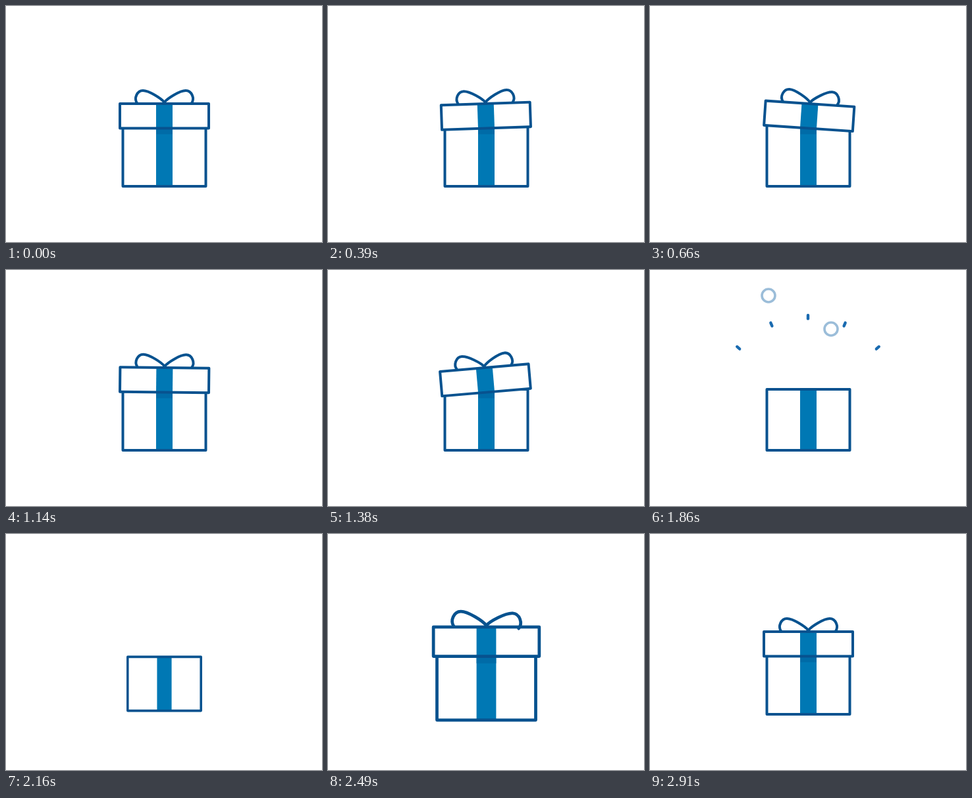
These frames come from a looping animation (480x360 px, 3540 ms). An HTML page:

```html
<!DOCTYPE html>
<html lang="en">
<head>
<meta charset="utf-8">
<title>Gift box</title>
<style>
  html, body { margin: 0; width: 100%; height: 100%; overflow: hidden; background: #fff; }
  svg { display: block; width: 100%; height: 100%; }
  .line { fill: none; stroke: #07528f; stroke-width: 4; stroke-linejoin: round; stroke-linecap: round; }
  .paper { fill: #fff; }
  .ribbon { fill: #0078b4; }
  .shade { fill: #006ba7; }
  .ring { stroke: #1262a6; stroke-width: 3.6; }
  .ray { stroke: #1a6bb0; stroke-width: 4.4; }
</style>
</head>
<body>
<svg viewBox="0 0 480 360">
  <g id="rays"></g>
  <circle id="ringA" class="line ring" r="10"/>
  <circle id="ringB" class="line ring" r="10"/>
  <g id="box">
    <rect class="paper" x="177.5" y="182" width="126" height="93"/>
    <rect class="ribbon" x="228" y="182" width="25" height="93"/>
    <rect class="line" x="177.5" y="182" width="126" height="93"/>
  </g>
  <rect id="shade" class="shade" x="228" y="186" width="25" height="9.5"/>
  <g id="lid">
    <rect class="paper" x="173" y="149" width="135" height="37.5"/>
    <rect class="ribbon" x="228" y="149" width="25" height="37.5"/>
    <rect class="line" x="173" y="149" width="135" height="37.5"/>
    <path class="line" d="M199 148C194 141 199 129 208 129C217 129 236 141 240.5 147"/>
    <path class="line" id="loop" d="M282 148C287 141 282 129 273 129C264 129 245 141 240.5 147"/>
  </g>
</svg>
<script>
const LOOP = 3540, CX = 240.5, HINGE = 186, MID = 228.5;
const $ = id => document.getElementById(id);
const clamp = x => Math.min(1, Math.max(0, x));
const span = (t, a, b) => clamp((t - a) / (b - a));
const ease = x => (1 - Math.cos(Math.PI * x)) / 2;
const out = x => 1 - (1 - x) ** 2;

// Eased value from a list of [time, value] steps
function track(t, steps) {
  let [t0, v0] = steps[0];
  for (const [t1, v1] of steps) {
    if (t < t1) return t <= t0 ? v0 : v0 + (v1 - v0) * ease(span(t, t0, t1));
    t0 = t1;
    v0 = v1;
  }
  return v0;
}

const TILT = [[0, 0], [150, -6], [300, 6], [450, -6], [600, 6], [750, 0],
  [1110, 0], [1260, 6], [1410, -6], [1530, 0]];
const SCALE = [[1950, 1], [2190, 0.88], [2430, 1.22], [2700, 0.975], [2910, 1]];
const SWAY = [[2190, 0], [2470, 4], [2760, -5], [2910, 0]];

const rays = [-48, -23, 0, 23, 48].map(deg => {
  const el = document.createElementNS("http://www.w3.org/2000/svg", "line");
  el.setAttribute("class", "line ray");
  el.setAttribute("transform", `translate(240 214) rotate(${deg})`);
  $("rays").append(el);
  return el;
});

const set = (el, attrs) => {
  for (const k in attrs) el.setAttribute(k, attrs[k]);
};
const scaleAt = (s, y) => `translate(${CX} ${y}) scale(${s}) translate(${-CX} ${-y})`;

function ring(el, t, start, from, to) {
  const p = out(span(t, start, start + 300));
  set(el, {
    cx: from[0] + (to[0] - from[0]) * p,
    cy: from[1] + (to[1] - from[1]) * p,
    opacity: t < start ? 0 : 1 - span(t, 1740, 1950)
  });
}

function draw(t) {
  const s = track(t, SCALE);
  set($("box"), { transform: scaleAt(s, MID) });

  const fly = t < 2190 ? span(t, 1530, 1710) : 0;
  const p = ease(fly);
  const seen = t < 2190 ? 1 - fly : span(t, 2190, 2280);
  const turn = track(t, TILT) + 50 * p;
  set($("lid"), {
    transform: `translate(${39 * p ** 1.5} ${-95 * p}) rotate(${turn} ${CX} ${HINGE}) ` + scaleAt(s, HINGE),
    opacity: seen
  });
  set($("loop"), { transform: `rotate(${track(t, SWAY)} ${CX} 147)` });
  set($("shade"), {
    transform: scaleAt(s, HINGE),
    opacity: t < 2190 ? 1 - span(t, 1530, 1560) : seen
  });

  ring($("ringA"), t, 1530, [238, 205], [180, 39]);
  ring($("ringB"), t, 1560, [247, 199], [275, 90]);

  const head = 108 + 37 * ease(span(t, 1560, 1800));
  const tail = 108 + 37 * ease(span(t, 1680, 1920));
  const lit = t >= 1560 && t < 1920 ? 1 : 0;
  for (const el of rays) set(el, { y1: -tail, y2: -head, opacity: lit });
}

const t0 = performance.now();
function frame() {
  draw((performance.now() - t0) % LOOP);
  requestAnimationFrame(frame);
}
draw(0);
requestAnimationFrame(frame);
</script>
</body>
</html>
```
